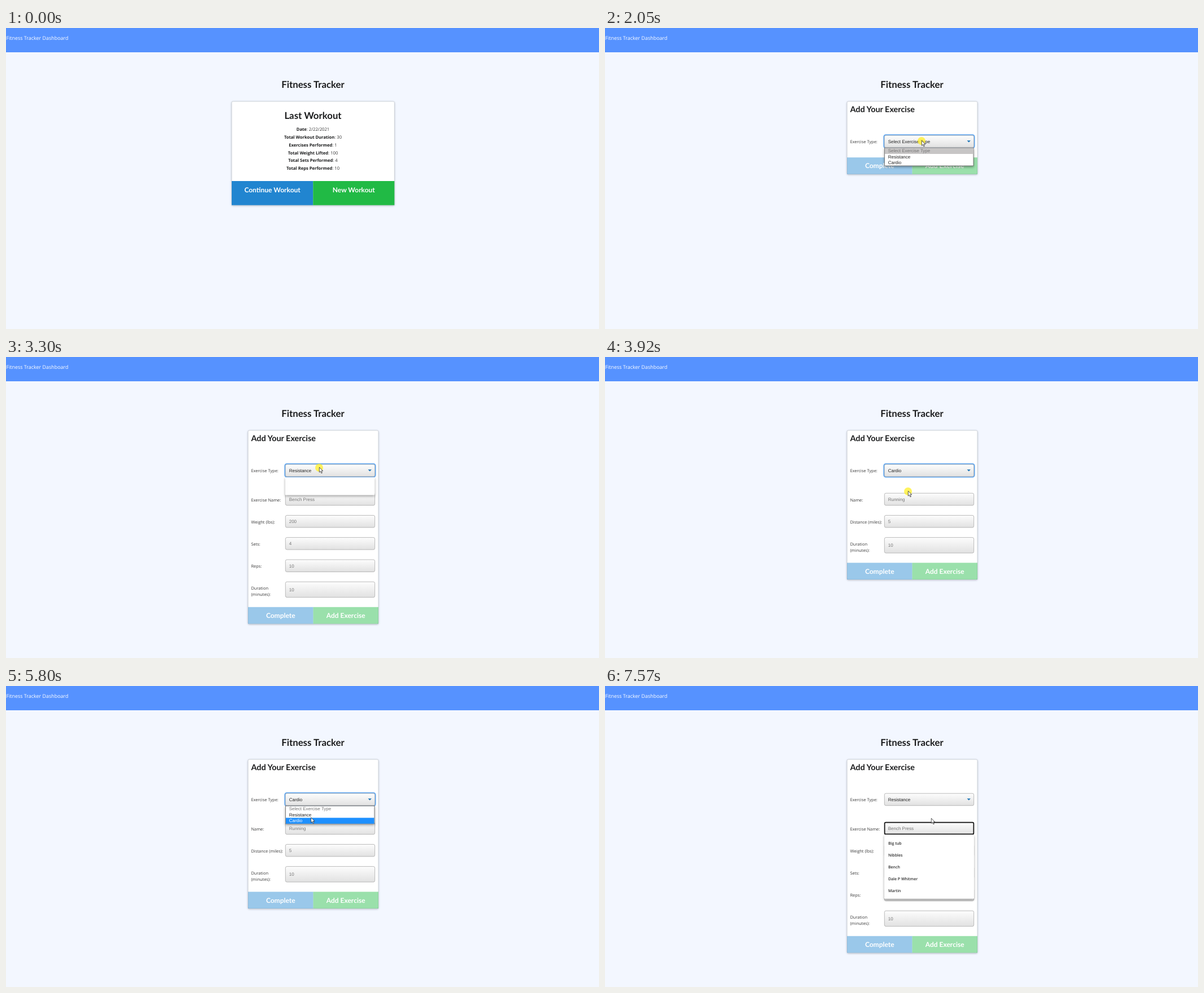
Recreate the animation shown at these times as an HTML page. Size 1051 by 533 pixels, loop 8000 ms.

```html
<!DOCTYPE html>
<html lang="en">
<head>
<meta charset="utf-8">
<title>Fitness Tracker</title>
<style>
html, body { margin: 0; width: 100%; height: 100%; overflow: hidden; background: #f3f7ff; }
svg { display: block; width: 1051px; height: 533px; }
text { font-family: "Open Sans", "Noto Sans", sans-serif; text-rendering: geometricPrecision; white-space: pre; }
.lato { font-family: Lato, sans-serif; font-weight: 700; }
.arial { font-family: "Liberation Sans", sans-serif; font-size: 8px; }
.card { filter: drop-shadow(0 1px 1.4px rgba(60, 70, 90, .32)); }
.pop { filter: drop-shadow(0 2px 2px rgba(0, 0, 0, .35)); }
</style>
</head>
<body>
<svg id="stage" viewBox="0 0 1051 533" xmlns="http://www.w3.org/2000/svg"></svg>
<script>
const LOOP = 8000;
const INK = '#1b1c1d', LABEL = '#3c3c3c', HINT = '#757575';
const stage = document.getElementById('stage');

const attrs = o => Object.entries(o).map(([k, v]) => ` ${k}="${v}"`).join('');
const rect = (x, y, w, h, fill, more = {}) =>
  `<rect${attrs({ x, y, width: w, height: h, fill, ...more })}/>`;
const text = (x, y, s, size, fill, more = {}) =>
  `<text${attrs({ x, y, 'font-size': size, fill, ...more })}>${s}</text>`;
const lato = (x, y, s, size, fill, anchor = 'middle') =>
  text(x, y, s, size, fill, { class: 'lato', 'text-anchor': anchor });
const arial = (y, s, fill, id) =>
  text(501.7, y, s, 8, fill, id ? { class: 'arial', id } : { class: 'arial' });
const group = (id, body) => `<g id="${id}">${body}</g>`;

// White card with two buttons along its bottom edge
function card(x, w, bottom, barH, left, right, size, opacity, hoverId) {
  const y = bottom - barH, mid = x + w / 2, base = y + barH / 2 + 4.4;
  const textY = opacity < 1 ? base : y + 19.6;
  const id = hoverId ? { id: hoverId } : {};
  return rect(x, 130, w, bottom - 130, '#fff',
      { rx: 2.2, stroke: '#d0d4da', 'stroke-width': 1, class: 'card' }) +
    rect(x, y, w / 2, barH, '#2185d0', { opacity }) +
    rect(mid, y, w / 2, barH, '#21ba45', { opacity, ...id }) +
    lato(x + w / 4, textY, left, size, '#fff') +
    lato(mid + w / 4, textY, right, size, '#fff');
}

const box = (y, h = 21.5) =>
  rect(495.3, y, 158.4, h, 'url(#grey)', { rx: 2.6, stroke: '#aaa', 'stroke-width': .8 });

function field(y, label, hint, tall) {
  const lines = label.split('|');
  return lines.map((s, i) => text(434.4, y + 14.3 + i * 11, s, 7.45, LABEL)).join('') +
    box(y, tall ? 27.5 : 21.5) + arial(y + (tall ? 16.8 : 13.8), hint, HINT);
}

function home() {
  const facts = [['Date', '2/22/2021'], ['Total Workout Duration', 30], ['Exercises Performed', 1],
    ['Total Weight Lifted', 100], ['Total Sets Performed', 4], ['Total Reps Performed', 10]];
  return card(400, 288.4, 313.7, 42.7, 'Continue Workout', 'New Workout', 12, 1, 'newBtn') +
    lato(544, 160.8, 'Last Workout', 16.8, INK) +
    facts.map(([k, v], i) => text(544, 182 + i * 13.85,
      `<tspan font-weight="700" font-size="7.6" fill="${INK}">${k}</tspan>: ${v}`, 7.7, '#333',
      { 'text-anchor': 'middle' })).join('');
}

const bottoms = [258.8, 472.4, 394];
const kinds = ['Select Exercise Type', 'Resistance', 'Cardio'];
const rowTop = i => 212.6 + i * 10.4;
const formCard = i => group('card' + i,
  card(429, 231, bottoms[i], 29.6, 'Complete', 'Add Exercise', 12, .45));

function form() {
  return kinds.map((_, i) => formCard(i)).join('') +
    lato(434.4, 149.4, 'Add Your Exercise', 14.4, INK, 'start') +
    text(434.4, 204.4, 'Exercise Type:', 7.45, LABEL) +
    rect(494.4, 189.4, 160.2, 23, 'none', { id: 'ring', rx: 3.4, stroke: '#62a9f3', 'stroke-width': 2.2 }) +
    box(190.2) + arial(203.8, '', '#222', 'choice') +
    '<path d="M641.6 199.2h6.4l-3.2 3.4z" fill="#1a73b5"/>' +
    group('fields1', field(241.2, 'Exercise Name:', 'Bench Press') + field(280.4, 'Weight (lbs):', 200) +
      field(319.6, 'Sets:', 4) + field(358.9, 'Reps:', 10) + field(398.1, 'Duration|(minutes):', 10, true)) +
    group('fields2', field(241.2, 'Name:', 'Running') + field(280.4, 'Distance (miles):', 5) +
      field(319.6, 'Duration|(minutes):', 10, true));
}

const menu = () =>
  rect(495.5, 212.3, 157.5, 31.7, '#fff', { stroke: '#707070', 'stroke-width': .9, class: 'pop' }) +
  rect(496, 0, 156.6, 10.4, '#1e90ff', { id: 'bar' }) +
  kinds.map((s, i) => arial(rowTop(i) + 7.7, s, '#222', 'row' + i)).join('');

const autofill = () =>
  rect(495.6, 241.6, 157.8, 20.8, 'none', { rx: 2, stroke: '#101010', 'stroke-width': 1.7 }) +
  rect(501.4, 247, .8, 9.5, '#222', { id: 'caret' }) +
  group('hints', rect(495, 263.2, 159, 113.6, '#fff', { rx: 1.5, class: 'pop' }) +
    ['Big tub', 'Nibbles', 'Bench', 'Dale P Whitmer', 'Martin'].map((s, i) =>
      text(502, 281.3 + i * 20.8, s, 6.95, '#2c2c2c', { 'font-weight': 600 })).join(''));

const pointers =
  group('arrow', '<path d="M.3 .3V9.2L2.4 7.3 3.9 10.8 5.4 10.2 3.9 6.7H6.8Z" fill="#fff" stroke="#222" stroke-width=".75"/>') +
  group('hand', '<path d="M-1.2 7V1Q0-.6 1.2 1V4.4Q2.4 3.8 3 4.8 4.2 4.2 4.7 5.3 6 4.9 6 6.4V9Q6 11 4.8 12.6H-.6Q-2.4 10-3.8 7.4-3.4 5.8-1.2 8Z" fill="#fff" stroke="#222" stroke-width=".8"/>') +
  group('beam', '<path d="M-2 0H2M0 0V9.5M-2 9.5H2" fill="none" stroke="#222" stroke-width=".8"/>');

stage.innerHTML =
  `<defs><linearGradient id="grey" x1="0" y1="0" x2="0" y2="1">
    <stop offset="0" stop-color="#fdfdfd"/><stop offset="1" stop-color="#e1e1e1"/></linearGradient></defs>` +
  rect(0, 0, 1051, 533, '#f3f7ff') + rect(0, 0, 1051, 43, '#5692ff') +
  text(.4, 21.3, 'Fitness Tracker Dashboard', 8.95, '#fff') +
  lato(544, 106, 'Fitness Tracker', 16.8, INK) +
  group('home', home()) + group('form', form()) +
  group('blank', rect(495, 213, 158.4, 31.5, '#fff', { class: 'pop' })) +
  group('menu', menu()) + group('autofill', autofill()) +
  '<circle id="glow" r="7" fill="#ffee20" opacity=".72"/>' + group('pointer', pointers);

const el = {};
stage.querySelectorAll('[id]').forEach(n => el[n.id] = n);
const show = (id, on) => el[id].setAttribute('display', on ? 'inline' : 'none');
const set = (id, k, v) => el[id].setAttribute(k, v);
const between = (t, a, b) => t >= a && t < b;

// Mouse path: time, x, y
const path = [
  [150, 928, 505], [500, 628, 353], [910, 816, 443], [1220, 600, 310], [1290, 597, 302],
  [1420, 597, 302], [1740, 470, 222], [1970, 561, 199], [2290, 561, 199], [2560, 540, 227],
  [2680, 540, 227], [2920, 555, 195], [3390, 555, 195], [3690, 537, 237], [3920, 537, 237],
  [4180, 546, 212], [4390, 546, 212], [4400, 547, 212], [4540, 547, 212], [4550, 547, 205],
  [4870, 547, 205], [5100, 546, 222], [5250, 545, 228], [5600, 545, 228], [5960, 537, 236],
  [6380, 537, 236], [6570, 531, 231], [6720, 531, 231], [7080, 548, 246], [7190, 548, 246],
  [7570, 578, 234]
];
const clicks = [[1340, 120], [1970, 170], [2600, 110], [3300, 150], [3840, 120], [4700, 80], [6580, 140], [7080, 110]];
const opened = [[1970, 2680], [3300, 3920], [4700, 6720]];
const marked = [[0, 0], [2400, 1], [3600, 2], [5175, 1], [5800, 2], [6500, 1]];
const chosen = [[0, 0], [2680, 1], [3920, 2], [6720, 1]];

const stepAt = (list, t) => list.reduce((v, [at, next]) => t >= at ? next : v, list[0][1]);

function mouse(t) {
  const i = path.findIndex(p => p[0] > t);
  if (i < 0) return path[path.length - 1].slice(1);
  if (i === 0) return path[0].slice(1);
  const [a, x, y] = path[i - 1], [b, u, v] = path[i];
  const p = (t - a) / (b - a), e = p * p * (3 - 2 * p);
  return [x + (u - x) * e, y + (v - y) * e];
}

function draw(t) {
  const [x, y] = mouse(t);
  const onForm = t >= 1460, kind = stepAt(chosen, t);
  const over = !onForm && between(x, 544, 688) && between(y, 271, 314);
  show('home', !onForm);
  show('form', onForm);
  set('newBtn', 'fill', !over ? '#21ba45' : t < 1270 ? '#16ab39' : '#1a9538');

  kinds.forEach((_, i) => show('card' + i, kind === i));
  show('fields1', kind === 1);
  show('fields2', kind === 2);
  el.choice.textContent = kinds[kind];
  show('ring', between(t, 1960, 7080));

  const open = opened.some(([a, b]) => between(t, a, b));
  const blank = between(t, 3300, 3390) || between(t, 4700, 4780);
  const row = stepAt(marked, t);
  show('blank', blank);
  show('menu', open && !blank);
  set('bar', 'y', rowTop(row));
  set('bar', 'fill', row ? '#1e90ff' : '#c7c5c5');
  kinds.forEach((_, i) => set('row' + i, 'fill', i === 0 ? HINT : i === row ? '#fff' : '#222'));

  show('autofill', t >= 7080);
  show('hints', t >= 7150);
  show('caret', t < 7500);

  const beam = t > 6900 && y > 239;
  show('pointer', t >= 150);
  set('pointer', 'transform', `translate(${x.toFixed(2)} ${y.toFixed(2)})`);
  show('arrow', !over && !beam);
  show('hand', over);
  show('beam', beam);
  show('glow', clicks.some(([a, d]) => between(t, a, a + d)));
  set('glow', 'cx', x);
  set('glow', 'cy', y + 1);
}

const start = performance.now();
function tick(now) {
  draw(Math.max(0, now - start) % LOOP);
  requestAnimationFrame(tick);
}
draw(0);
requestAnimationFrame(tick);
</script>
</body>
</html>
```
